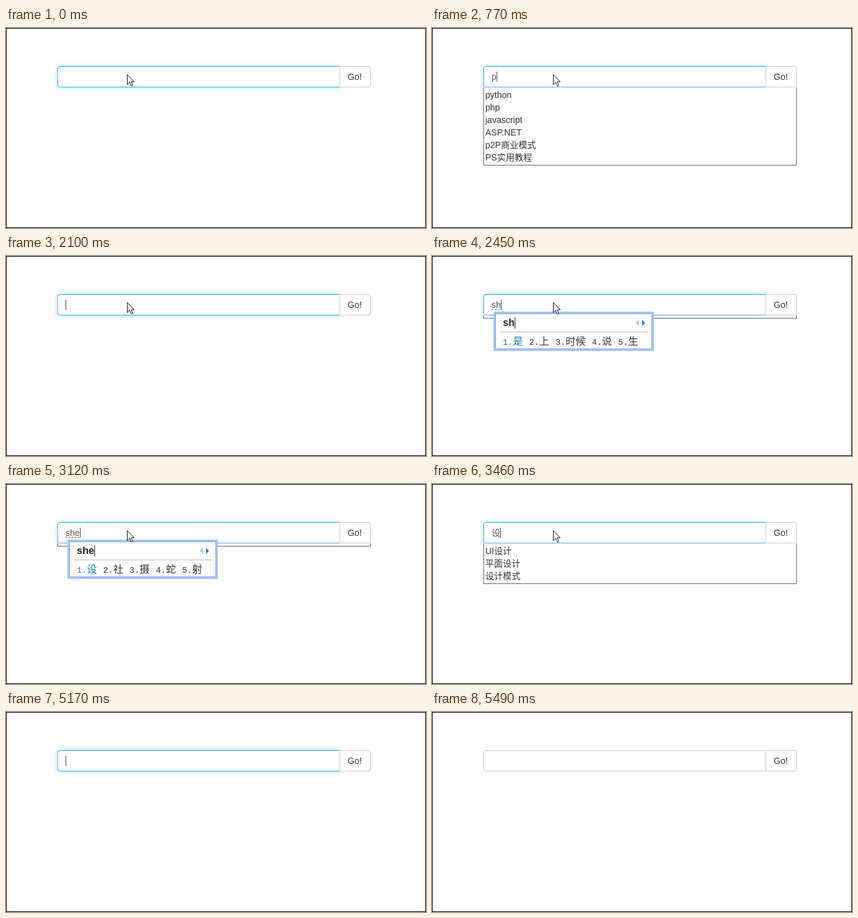
Recreate the animation shown at these times as an HTML page. Size 670x320 px, loop 5840 ms.

```html
<!DOCTYPE html>
<html lang="zh-CN">
<head>
<meta charset="utf-8">
<title>Search suggestions</title>
<style>
  html, body { margin: 0; width: 100%; height: 100%; overflow: hidden; background: #fff; }
  #stage {
    position: relative; box-sizing: border-box; width: 670px; height: 320px;
    font: 14px/20px "Liberation Sans", "Noto Sans CJK SC", "Noto Sans CJK", sans-serif;
    color: #333; background: #fff; overflow: hidden;
  }
  #stage * { box-sizing: border-box; }
  #stage > * { position: absolute; }
  #frame { inset: 0; border: 1px solid #000; }
  #field {
    left: 82px; top: 61px; width: 451px; height: 34px; padding: 6px 12px;
    border: 1px solid #ccc; border-radius: 4px 0 0 4px; background: #fff;
    box-shadow: inset 0 1px 1px rgba(0, 0, 0, .05); color: #555; white-space: pre;
  }
  #field.focus {
    border-color: #4da3fb;
    box-shadow: inset 0 1px 1px rgba(0, 0, 0, .05), 0 0 6px rgba(105, 235, 255, .85);
  }
  #field.composing span { text-decoration: underline dashed 1px #666; text-underline-offset: 2px; }
  #go {
    left: 532px; top: 61px; width: 50px; height: 34px; padding: 6px 12px;
    border: 1px solid #ccc; border-radius: 0 4px 4px 0; background: #fff;
  }
  #list {
    left: 82px; top: 95px; width: 500px; padding: 2px;
    border: 1px solid #666; border-top: 0; background: #fff;
  }
  #list div { height: 20px; white-space: pre; }
  #caret { top: 70px; width: 1px; height: 16px; background: #444; }
  #ime {
    left: 98px; top: 89px; height: 63px;
    border: 3px solid #a0c8ff; background: #fff; box-shadow: inset 0 0 0 1px #8fa3d8;
  }
  #ime > * { position: absolute; }
  #typed {
    left: 12px; top: 5px; height: 20px; font-size: 16px; font-weight: bold;
    color: #222; white-space: pre;
  }
  #typed::after {
    content: ""; position: absolute; left: 100%; top: 1px;
    width: 1px; height: 18px; background: #222;
  }
  #rule { left: 8px; right: 7px; top: 29px; height: 1px; background: #b8b8b8; }
  #arrows { right: 10px; top: 10px; }
  #words { left: 12px; top: 33px; height: 20px; white-space: nowrap; display: flex; gap: 10px; }
  #words span {
    font: 300 16px/20px "Noto Sans CJK SC", "Noto Sans CJK", sans-serif;
    height: 20px; color: #333;
  }
  #words span:first-child { color: #1480a8; }
  #words b { font: 13.33px/20px "Liberation Mono", monospace; }
  #pointer { left: 193px; top: 74px; }
</style>
</head>
<body>
<div id="stage">
  <div id="field"><span id="text"></span></div>
  <div id="go">Go!</div>
  <div id="list"></div>
  <div id="caret"></div>
  <div id="ime">
    <div id="typed"></div>
    <svg id="arrows" width="17" height="10">
      <path d="M6 0V10L1 5Z" fill="#a9cdd0"/>
      <path d="M11 0V10L16 5Z" fill="#3f83a8"/>
    </svg>
    <div id="rule"></div>
    <div id="words"></div>
  </div>
  <svg id="pointer" width="13" height="20">
    <path d="M.5 .5V16.5L4.2 13L6.7 18.5H8.5L9 17.5L6.8 12H11.5Z" fill="#fff" stroke="#111"/>
  </svg>
  <div id="frame"></div>
</div>
<script>
  const LOOP = 5840;
  const el = id => document.getElementById(id);
  const show = (id, on) => { el(id).style.display = on ? "" : "none"; };

  const all = ["python", "php", "javascript", "ASP.NET", "p2P商业模式", "PS实用教程"];
  const py = { text: "py", list: ["python"], caret: 110 };
  const she = { list: [], width: 240 };
  const design = { text: "设", list: ["UI设计", "平面设计", "设计模式"] };

  // Each entry holds from its time until the next one.
  const scenes = [
    { at: 0 },
    { at: 100, caret: 95 },
    { at: 420 },
    { at: 770, text: "p", list: all, caret: 103 },
    { at: 1090, ...py },
    { at: 1440, ...py, text: "pyth", caret: 122 },
    { at: 1760, ...py },
    { at: 2100, caret: 95 },
    { at: 2450, ...she, text: "sh", caret: 110, width: 256, words: ["是", "上", "时候", "说", "生"] },
    { at: 3120, ...she, text: "she", caret: 118, words: ["设", "社", "摄", "蛇", "射"] },
    { at: 3460, ...design, caret: 109 },
    { at: 3780, ...design },
    { at: 4150, caret: 95 },
    { at: 4490 },
    { at: 4830, away: true },
    { at: 5170, away: true, caret: 95 },
    { at: 5490, away: true, blur: true }
  ];

  function draw({ text = "", list, caret, words, width, away, blur }) {
    el("text").textContent = text;
    el("field").className = (blur ? "" : "focus") + (words ? " composing" : "");
    show("list", list);
    el("list").innerHTML = (list || []).map(s => `<div>${s}</div>`).join("");
    show("caret", caret);
    el("caret").style.left = (caret || 0) + "px";
    show("pointer", !away);
    show("ime", words);
    if (words) {
      el("ime").style.width = width + "px";
      el("typed").textContent = text;
      el("words").innerHTML = words.map((w, i) => `<span><b>${i + 1}.</b>${w}</span>`).join("");
    }
  }

  let current;
  function tick() {
    const t = performance.now() % LOOP;
    const scene = scenes.findLast(s => s.at <= t);
    if (scene !== current) draw(current = scene);
    requestAnimationFrame(tick);
  }
  tick();
</script>
</body>
</html>
```
